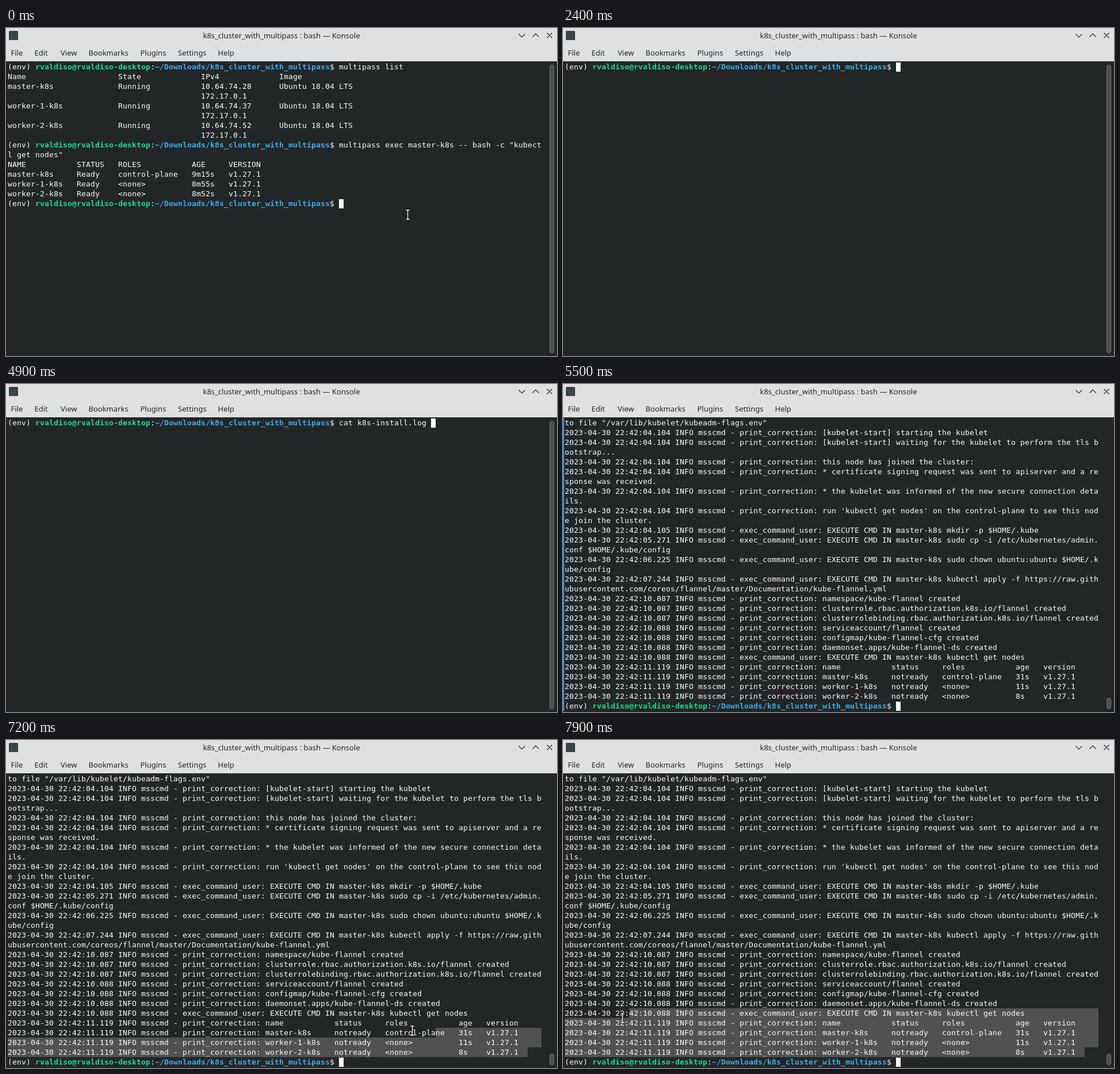
Recreate the animation shown at these times as an HTML page. Size 958 by 571 pixels, loop 8000 ms.

```html
<!DOCTYPE html>
<html lang="en">
<head>
<meta charset="utf-8">
<title>Terminal</title>
<style>
  html, body { margin: 0; width: 100%; height: 100%; overflow: hidden; background: #232627; }
  svg, pre { position: absolute; left: 0; top: 0; margin: 0; }
  svg { width: 958px; height: 571px; }
  .ui { font: 13px "Noto Sans", sans-serif; fill: #232629; }
  .line { fill: none; stroke: #232629; stroke-width: 1.2; }
  pre { left: 3px; top: 59px; color: #fcfcfc; white-space: pre;
        font: 13px/17px "DejaVu Sans Mono", monospace; font-variant-ligatures: none; }
  b { font-weight: 700; color: #1cdc9a; }
  b.path { color: #3daee9; }
</style>
</head>
<body>
<svg viewBox="0 0 958 571">
  <rect width="958" height="571" fill="#232627"/>
  <rect width="958" height="58" fill="#dee0e2"/>
  <rect x="5" y="5" width="16" height="16" rx="1" fill="#3b4446"/>
  <text class="ui" x="479" y="18" text-anchor="middle">k8s_cluster_with_multipass : bash — Konsole</text>
  <g class="ui" id="menu"></g>
  <path class="line" d="M891.5 10.5l5.5 5.5 5.5-5.5M915.5 15.5l5.5-5.5 5.5 5.5M940.5 8.5l9 9m0-9l-9 9"/>
  <rect id="thumb" x="945.5" width="7" rx="3.5" fill="#4c4f50" stroke="#707374"/>
  <rect id="mark" y="59" width="2" height="510"/>
  <path id="selection" fill="#505152"/>
  <rect id="cursor" width="8" height="16" fill="#fcfcfc"/>
</svg>
<pre id="text"></pre>
<svg viewBox="0 0 958 571">
  <g id="pointer" fill="none">
    <path d="M-3 -8H3M0 -8V8M-3 8H3" stroke="#111" stroke-width="3"/>
    <path d="M-3 -8H3M0 -8V8M-3 8H3" stroke="#fff" stroke-width="1.4"/>
  </g>
</svg>
<script>
const LOOP = 8000, COLS = 116, CELL = 8, ROW = 17, LEFT = 3, TOP = 59;
const el = id => document.getElementById(id);
const set = (id, attrs) => {
  for (const k in attrs) el(id).setAttribute(k, attrs[k]);
};
const esc = s => s.replace(/&/g, '&amp;').replace(/</g, '&lt;');
const table = (widths, rows) => rows.map(r =>
  r.split('|').map((cell, i) => cell.padEnd(widths[i] || 0)).join(''));

// Terminal glyphs sit on a grid of whole-pixel cells.
function snapToGrid(pre) {
  pre.textContent = 'm'.repeat(COLS);
  const advance = pre.getBoundingClientRect().width / COLS;
  pre.style.letterSpacing = `${CELL - advance}px`;
}
snapToGrid(el('text'));

const menu = { File: 8.5, Edit: 49.5, View: 95, Bookmarks: 143.5, Plugins: 233.5, Settings: 299, Help: 368.5 };
el('menu').innerHTML = Object.entries(menu)
  .map(([name, x]) => `<text x="${x}" y="48">${name}</text>`).join('');

const user = 'rvaldiso';
const parts = ['(env) ', `${user}@${user}-desktop`, ':', '~/Downloads/k8s_cluster_with_multipass', '$ '];
const plainPrompt = parts.join('');
const promptHtml = `${parts[0]}<b>${parts[1]}</b>:<b class="path">${parts[3]}</b>$ `;

const wrap = s => s.match(new RegExp(`.{1,${COLS}}`, 'g'));
const html = lines => lines.flatMap(wrap).map(esc)
  .map(s => s.replace(plainPrompt, () => promptHtml));

const listing = html([
  plainPrompt + 'multipass list',
  ...table([24, 18, 17], [
    'Name|State|IPv4|Image',
    'master-k8s|Running|10.64.74.28|Ubuntu 18.04 LTS',
    '||172.17.0.1',
    'worker-1-k8s|Running|10.64.74.37|Ubuntu 18.04 LTS',
    '||172.17.0.1',
    'worker-2-k8s|Running|10.64.74.52|Ubuntu 18.04 LTS',
    '||172.17.0.1']),
  plainPrompt + 'multipass exec master-k8s -- bash -c "kubectl get nodes"',
  ...table([15, 9, 16, 8], [
    'NAME|STATUS|ROLES|AGE|VERSION',
    'master-k8s|Ready|control-plane|9m15s|v1.27.1',
    'worker-1-k8s|Ready|<none>|8m55s|v1.27.1',
    'worker-2-k8s|Ready|<none>|8m52s|v1.27.1'])
]);

const log = (time, fn, msg) => `2023-04-30 22:42:${time} INFO msscmd - ${fn}: ${msg}`;
const say = (time, ...msgs) => msgs.map(m => log(time, 'print_correction', m));
const run = (time, cmd) => log(time, 'exec_command_user', 'EXECUTE CMD IN master-k8s ' + cmd);

const install = html([
  'to file "/var/lib/kubelet/kubeadm-flags.env"',
  ...say('04.104',
    '[kubelet-start] starting the kubelet',
    '[kubelet-start] waiting for the kubelet to perform the tls bootstrap...',
    'this node has joined the cluster:',
    '* certificate signing request was sent to apiserver and a response was received.',
    '* the kubelet was informed of the new secure connection details.',
    "run 'kubectl get nodes' on the control-plane to see this node join the cluster."),
  run('04.105', 'mkdir -p $HOME/.kube'),
  run('05.271', 'sudo cp -i /etc/kubernetes/admin.conf $HOME/.kube/config'),
  run('06.225', 'sudo chown ubuntu:ubuntu $HOME/.kube/config'),
  run('07.244', 'kubectl apply -f https://raw.githubusercontent.com/coreos/flannel/master/Documentation/kube-flannel.yml'),
  ...say('10.087',
    'namespace/kube-flannel created',
    'clusterrole.rbac.authorization.k8s.io/flannel created',
    'clusterrolebinding.rbac.authorization.k8s.io/flannel created'),
  ...say('10.088',
    'serviceaccount/flannel created',
    'configmap/kube-flannel-cfg created',
    'daemonset.apps/kube-flannel-ds created'),
  run('10.088', 'kubectl get nodes'),
  ...say('11.119', ...table([15, 11, 16, 6], [
    'name|status|roles|age|version',
    'master-k8s|notready|control-plane|31s|v1.27.1',
    'worker-1-k8s|notready|<none>|11s|v1.27.1',
    'worker-2-k8s|notready|<none>|8s|v1.27.1']))
]);

// Each step changes only the fields it names.
const BLUE = '#1d99f3', GREY = '#7f8c8d';
const changes = [
  [0, { lines: listing, typed: '', at: [698.5, 325], sel: null, mark: 'none', thumb: [64.5, 501] }],
  [800, { typed: 'c', at: null }],
  [1300, { typed: 'cle' }],
  [1500, { typed: 'clea' }],
  [1900, { typed: 'clear' }],
  [2400, { lines: [], typed: '' }],
  [3300, { typed: 'ca' }],
  [3400, { typed: 'cat ' }],
  [3800, { typed: 'cat k8s-install.' }],
  [4800, { typed: 'cat k8s-install.l' }],
  [4900, { typed: 'cat k8s-install.log ' }],
  [5500, { lines: install, typed: '', mark: BLUE, thumb: [546.5, 19] }],
  [5800, { mark: GREY }],
  [6200, { at: [734.5, 325] }],
  [6300, { at: [742, 314] }],
  [6500, { at: [845.5, 539] }],
  [6700, { at: [880.5, 524] }],
  [6900, { at: [895.5, 532] }],
  [7000, { at: [904.5, 536] }],
  [7200, { at: [706.5, 506], sel: [93, 26], mark: 'none' }],
  [7400, { at: [430.5, 469], sel: [57, 24] }],
  [7500, { at: [288.5, 484], sel: [37, 24] }],
  [7700, { at: [175.5, 487], sel: [24, 24] }],
  [7900, { at: [103.5, 484], sel: [14, 24] }]
];
let state = {};
const steps = changes.map(([time, change]) => ({ ...(state = { ...state, ...change }), time }));

// Selected area from a start cell to the fixed end cell (113, 28).
function selectionPath(sel) {
  if (!sel) return '';
  const x = LEFT + sel[0] * CELL, y = TOP + sel[1] * ROW, last = TOP + 28 * ROW;
  return `M${x} ${y}H${LEFT + COLS * CELL}V${last}H${LEFT + 113 * CELL}V${last + ROW}H${LEFT}V${y + ROW}H${x}Z`;
}

function show(s) {
  el('text').innerHTML = [...s.lines, promptHtml + s.typed].join('\n');
  set('cursor', {
    x: LEFT + (plainPrompt.length + s.typed.length) * CELL,
    y: TOP + 1 + s.lines.length * ROW
  });
  set('thumb', { y: s.thumb[0], height: s.thumb[1] });
  set('mark', { fill: s.mark });
  set('selection', { d: selectionPath(s.sel) });
  set('pointer', s.at
    ? { visibility: 'visible', transform: `translate(${s.at})` }
    : { visibility: 'hidden' });
}

let shown = null;
function tick() {
  const t = performance.now() % LOOP;
  const step = steps.filter(s => s.time <= t).pop();
  if (step !== shown) show(shown = step);
  requestAnimationFrame(tick);
}
tick();
</script>
</body>
</html>
```
